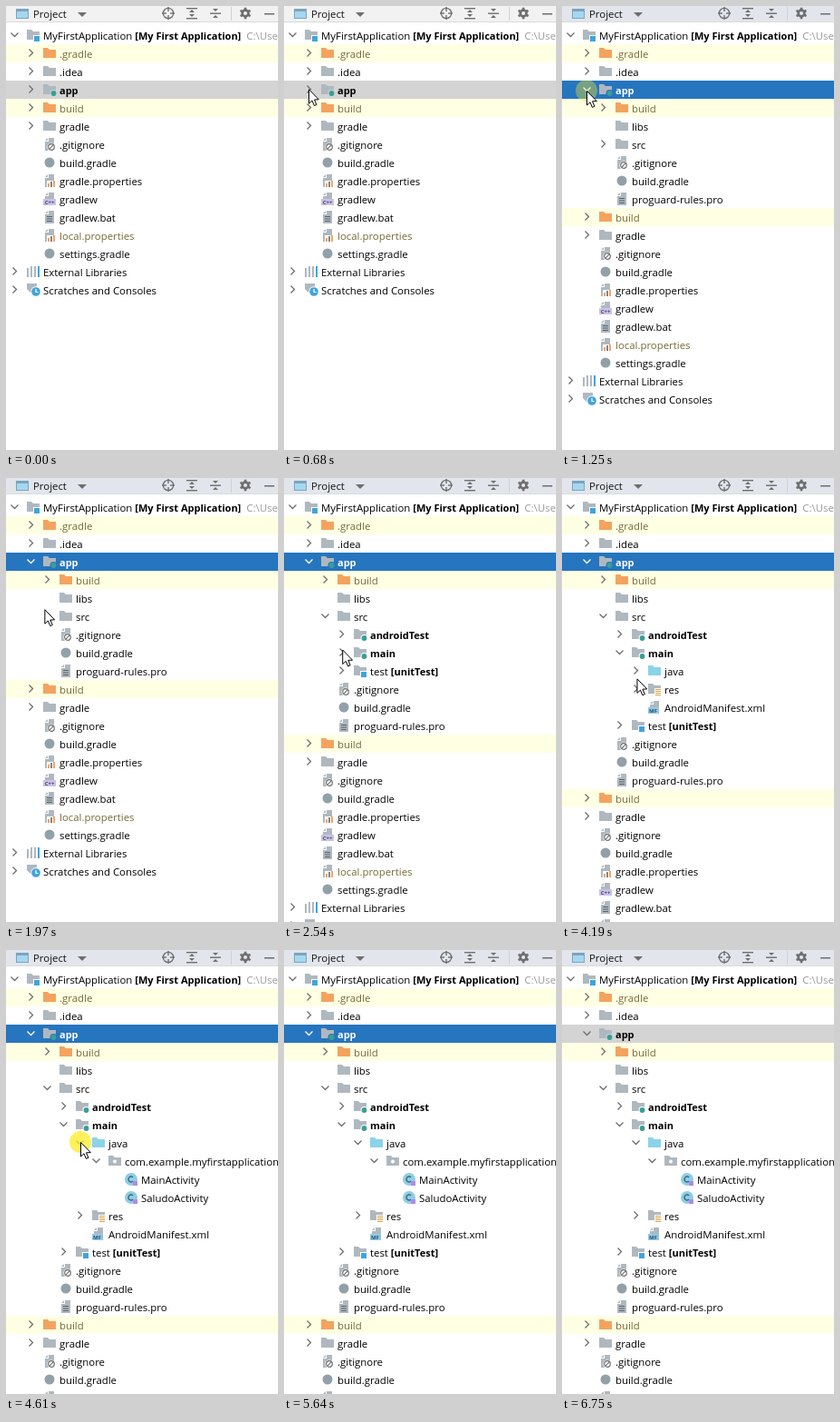
These frames come from a looping animation (300 by 488 pixels, 6.82 s). An HTML page with a canvas:

```html
<!DOCTYPE html>
<html lang="en">
<head>
<meta charset="utf-8">
<title>Project tree</title>
<style>
html, body { margin: 0; width: 100%; height: 100%; overflow: hidden; background: #fff; }
canvas { display: block; }
</style>
</head>
<body>
<canvas id="stage" width="300" height="488"></canvas>
<script>
const g = document.getElementById('stage').getContext('2d');
const LOOP = 6820;
const GREY = '#afb8bf', ORANGE = '#f4a35f', BLUE = '#40a4dc', GREEN = '#3a9e95', INK = '#6e6e6e';
const OPEN_APP = 870, OPEN_SRC = 2280, OPEN_MAIN = 3160, OPEN_JAVA = 4610, BLUR = 6750;
const CLOSED = Infinity;

// depth, icon, text, time shown, time its arrow opens (none: no arrow)
const rows = [
  [0, 'root', 'MyFirstApplication *[My First Application]', 0, 0],
  [1, 'orange', '.gradle', 0, CLOSED],
  [1, 'folder', '.idea', 0, CLOSED],
  [1, 'module', '*app', 0, OPEN_APP],
  [2, 'orange', 'build', OPEN_APP, CLOSED],
  [2, 'folder', 'libs', OPEN_APP],
  [2, 'folder', 'src', OPEN_APP, OPEN_SRC],
  [3, 'module', '*androidTest', OPEN_SRC, CLOSED],
  [3, 'module', '*main', OPEN_SRC, OPEN_MAIN],
  [4, 'java', 'java', OPEN_MAIN, OPEN_JAVA],
  [5, 'pack', 'com.example.myfirstapplication', OPEN_JAVA, 0],
  [6, 'cls', 'MainActivity', OPEN_JAVA],
  [6, 'cls', 'SaludoActivity', OPEN_JAVA],
  [4, 'res', 'res', OPEN_MAIN, CLOSED],
  [4, 'mf', 'AndroidManifest.xml', OPEN_MAIN],
  [3, 'root', 'test *[unitTest]', OPEN_SRC, CLOSED],
  [2, 'ignore', '.gitignore', OPEN_APP],
  [2, 'gradle', 'build.gradle', OPEN_APP],
  [2, 'lines', 'proguard-rules.pro', OPEN_APP],
  [1, 'orange', 'build', 0, CLOSED],
  [1, 'folder', 'gradle', 0, CLOSED],
  [1, 'ignore', '.gitignore', 0],
  [1, 'gradle', 'build.gradle', 0],
  [1, 'props', 'gradle.properties', 0],
  [1, 'cpp', 'gradlew', 0],
  [1, 'lines', 'gradlew.bat', 0],
  [1, 'props', 'local.properties', 0],
  [1, 'gradle', 'settings.gradle', 0],
  [0, 'libs', 'External Libraries', 0, CLOSED],
  [0, 'scratch', 'Scratches and Consoles', 0, CLOSED]
];

// pointer path: time, x, y
const path = [
  [270, 264, 463], [630, 27, 87], [710, 27, 93], [1470, 27, 93], [2130, 45, 153],
  [2400, 45, 153], [2560, 65, 190], [2700, 66, 192], [3720, 66, 192], [3830, 65, 200],
  [3860, 65, 200], [4230, 83, 221], [4410, 82, 211], [4850, 82, 211], [5260, 118, 265],
  [5300, 118, 265], [5640, 259, 470]
];
// click highlight: start, fade start, end
const clicks = [
  [OPEN_APP, 1190, 1310], [OPEN_SRC, 2330, 2460],
  [OPEN_MAIN, 3700, 3830], [OPEN_JAVA, 4720, 4850]
];

function rect(x, y, w, h, color) { g.fillStyle = color; g.fillRect(x, y, w, h); }

function disc(x, y, r, color) {
  g.fillStyle = color;
  g.beginPath();
  g.arc(x, y, r, 0, 7);
  g.fill();
}

function ring(x, y, r, color, width) {
  g.strokeStyle = color;
  g.lineWidth = width;
  g.beginPath();
  g.arc(x, y, r, 0, 7);
  g.stroke();
}

function trace(points) {
  g.beginPath();
  points.forEach(p => g.lineTo(...p));
}

function poly(points, color) { trace(points); g.fillStyle = color; g.fill(); }

function line(points, color, width = 1) {
  trace(points);
  g.strokeStyle = color;
  g.lineWidth = width;
  g.stroke();
}

function text(s, x, y, color, bold) {
  g.font = (bold ? 'bold 11px' : '11.4px') + ' "Open Sans", sans-serif';
  g.fillStyle = color;
  g.fillText(s, x, y);
  return x + g.measureText(s).width;
}

function label(s, x, y, color) {
  g.font = 'bold 6px "Open Sans", sans-serif';
  g.fillStyle = color;
  g.textAlign = 'center';
  g.fillText(s, x, y);
  g.textAlign = 'left';
}

function folder(color) {
  poly([[-7, -6], [-2, -6], [0, -4], [7, -4], [7, 5], [-7, 5]], color);
}

function page() {
  poly([[-1, -7], [5, -7], [5, 7], [-5, 7], [-5, -3], [-1, -3]], GREY);
  poly([[-5, -4], [-2, -7], [-2, -4]], GREY);
}

const icons = {
  folder: () => folder(GREY),
  orange: () => folder(ORANGE),
  java: () => folder('#8bd3e8'),
  root() {
    folder(GREY);
    rect(0, 0, 7, 7, '#fff');
    rect(1, 1, 6, 6, BLUE);
  },
  module(bg) {
    folder(GREY);
    disc(4.5, 4, 4, bg);
    disc(4.5, 4, 2.9, GREEN);
  },
  pack() {
    folder(GREY);
    disc(0, .5, 2, '#fff');
  },
  res() {
    folder(GREY);
    rect(0, -1, 8, 8, '#fff');
    for (let i = 0; i < 4; i++) rect(1, 2 * i, 6, 1, '#d9a343');
  },
  ignore() {
    page();
    disc(2, 3, 4.6, '#fff');
    ring(2, 3, 3.3, INK, 1.2);
    line([[-.3, 5.3], [4.3, .7]], INK, 1.2);
  },
  gradle: () => disc(0, 0, 5.5, '#91a1a8'),
  lines() {
    page();
    for (let i = 0; i < 3; i++) rect(-3, -1 + 2.5 * i, 6, 1, '#58636a');
  },
  props() {
    page();
    rect(-3, 0, 10, 8, '#fff');
    rect(-2, 3, 2, 4, ORANGE);
    rect(1, 1, 2, 6, '#7c878e');
    rect(4, 0, 2, 7, ORANGE);
  },
  cpp() {
    page();
    rect(-7, 0, 14, 7, '#c9c2e6');
    label('C++', 0, 5.7, '#4c4273');
  },
  mf() {
    page();
    rect(-7, 0, 11, 7, '#8fcbea');
    label('MF', -1.5, 5.7, '#2f4f66');
  },
  cls() {
    disc(0, 0, 7, '#8dcee5');
    g.strokeStyle = '#375b69';
    g.lineWidth = 1.3;
    g.beginPath();
    g.arc(0, 0, 3, .8, 5.5);
    g.stroke();
    rect(2, 2, 5, 5, '#b08ae6');
  },
  libs() {
    [GREY, GREY, GREY, BLUE].forEach((c, i) => rect(-7 + 4 * i, i ? -6 : -4, 2, i ? 12 : 10, c));
  },
  scratch() {
    poly([[-7, -7], [4, -7], [4, 3], [-3, 3], [-7, -1]], GREY);
    disc(3, 2, 5.7, '#fff');
    disc(3, 2, 4.8, BLUE);
    line([[3, -1], [3, 2.5], [5.5, 2.5]], '#fff', 1.2);
  }
};

function header(t) {
  rect(0, 0, 300, 17, t < OPEN_APP ? '#f2f2f2' : '#e2e6ec');
  rect(0, 17, 300, 1, '#d8dadc');
  rect(11, 3, 14, 11, '#7ba5bd');
  rect(12, 6, 12, 7, '#a5d8f0');
  text('Project', 30, 13, '#111');
  poly([[79, 7], [89, 7], [84, 12]], INK);
  ring(179, 8, 5.7, INK, 1.3);
  for (const [x, y] of [[1, 0], [-1, 0], [0, 1], [0, -1]])
    line([[179 + 2 * x, 8 + 2 * y], [179 + 7 * x, 8 + 7 * y]], INK, 1.4);
  for (const [x, dir] of [[205, 1], [231, -1]]) {
    if (dir > 0) {
      rect(x - 6, 2, 12, 1.4, INK);
      rect(x - 6, 13, 12, 1.4, INK);
    } else rect(x - 6, 7.5, 12, 1.4, INK);
    for (const side of [-1, 1]) {
      const tip = 8 + side * (dir > 0 ? 4 : 2), base = tip - side * dir * 3;
      poly([[x - 3, base], [x + 3, base], [x, tip]], INK);
    }
  }
  rect(248, 1, 1, 15, '#cfd1d3');
  ring(264, 8, 3.4, INK, 2.6);
  for (let a = 0; a < 6.2; a += Math.PI / 3) {
    const c = Math.cos(a + .52), s = Math.sin(a + .52);
    line([[264 + 4 * c, 8 + 4 * s], [264 + 6.3 * c, 8 + 6.3 * s]], INK, 2.6);
  }
  rect(285, 8, 11, 1.5, INK);
}

function drawRow([depth, icon, s, , opens], y, t) {
  const indent = 18 * depth;
  const chosen = s === '*app', active = chosen && t >= OPEN_APP && t < BLUR;
  const bg = active ? '#2675bf' : chosen ? '#d4d4d4' : icon === 'orange' ? '#ffffe4' : '#fff';
  rect(0, y - 11, 300, 20, bg);

  if (opens !== undefined) {
    const x = 9.5 + indent, cy = y - 1.5;
    line(t >= opens ? [[x - 4, cy - 2], [x, cy + 2], [x + 4, cy - 2]]
                    : [[x - 2, cy - 4], [x + 2, cy], [x - 2, cy + 4]],
      active ? '#fff' : INK, 1.3);
  }
  g.save();
  g.translate(30 + indent, y - 1);
  icons[icon](bg);
  g.restore();

  const ignored = icon === 'orange' || s === 'local.properties';
  const color = active ? '#fff' : ignored ? '#756a36' : '#000';
  const [plain, bold] = s.split('*');
  let x = text(plain, 41 + indent, y + 4, color);
  if (bold) x = text(bold, x, y + 4, color, true);
  if (!depth && bold) text('C:\\Users', x + 6, y + 4, '#9a9a9a');
}

function pointerAt(t) {
  const i = path.findIndex(p => p[0] > t);
  if (i < 1) return null;
  const [t0, x0, y0] = path[i - 1], [t1, x1, y1] = path[i];
  const k = (t - t0) / (t1 - t0), e = k * k * (3 - 2 * k);
  return [x0 + (x1 - x0) * e, y0 + (y1 - y0) * e];
}

function pointer(t) {
  const p = pointerAt(t);
  if (!p) return;
  g.save();
  g.translate(...p);
  const click = clicks.find(c => t >= c[0] && t < c[2]);
  if (click) {
    g.globalAlpha = .75 * Math.min(1, (click[2] - t) / (click[2] - click[1]));
    disc(0, 0, 12, '#fdec24');
    g.globalAlpha = 1;
  }
  trace([[.5, .5], [.5, 16], [4, 12.8], [6.4, 18.4], [8.9, 17.3], [6.5, 11.8], [11.3, 11.6]]);
  g.closePath();
  g.fillStyle = '#fff';
  g.fill();
  g.strokeStyle = '#000';
  g.lineWidth = 1;
  g.stroke();
  g.restore();
}

function draw(now) {
  const t = now % LOOP;
  rect(0, 0, 300, 488, '#fff');
  header(t);
  rows.filter(r => t >= r[3]).forEach((r, i) => drawRow(r, 33 + 20 * i, t));
  pointer(t);
}

const start = performance.now();
function tick() {
  draw(performance.now() - start);
  requestAnimationFrame(tick);
}
tick();
</script>
</body>
</html>
```
